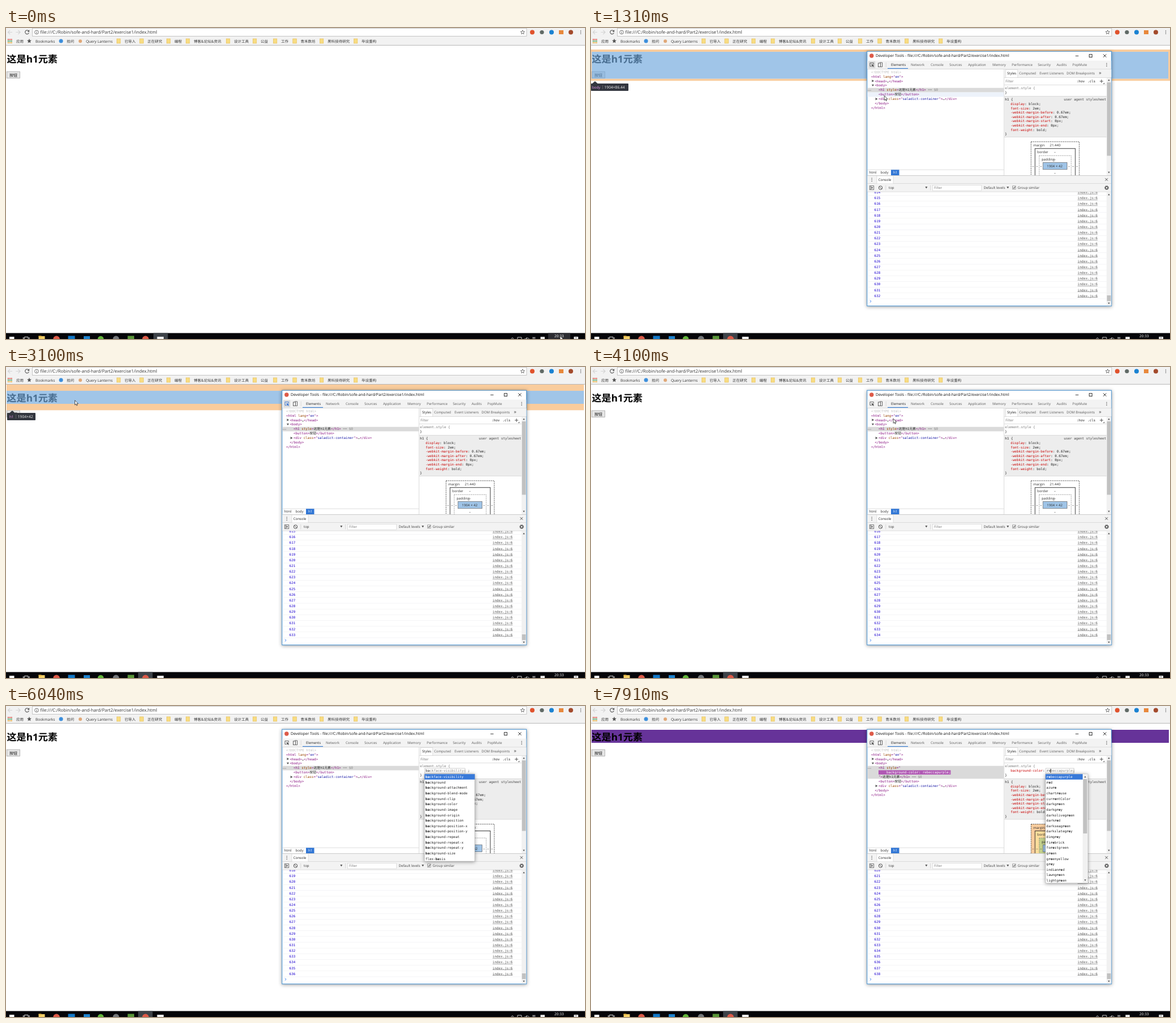
Recreate the animation shown at these times as an HTML page. Size 1021x549 px, loop 8000 ms.

```html
<!DOCTYPE html>
<html lang="zh">
<head>
<meta charset="utf-8">
<title>Inspecting an element</title>
<style>
html, body { margin: 0; width: 100%; height: 100%; overflow: hidden; background: #fff; }
svg { display: block; width: 100%; height: 100%; }
text { white-space: pre; text-rendering: geometricPrecision; font-family: 'Open Sans', 'Noto Sans CJK SC', 'Noto Sans CJK', sans-serif; }
.mono { font-family: 'DejaVu Sans Mono', 'Noto Sans CJK SC', 'Noto Sans CJK', monospace; }
.bold { font-weight: 700; }
.shadow { filter: drop-shadow(0 1px 3px rgba(0,0,0,.4)); }
</style>
</head>
<body>
<svg viewBox="0 0 1021 549" xmlns="http://www.w3.org/2000/svg">
  <defs>
    <clipPath id="paneClip"><rect x="728" y="101" width="181" height="159"/></clipPath>
    <clipPath id="logClip"><rect x="487" y="289.5" width="422" height="201"/></clipPath>
  </defs>
  <g id="page"></g>
  <g id="overlay"></g>
  <g id="chrome"></g>
  <g id="taskbar"></g>
  <g id="dev">
    <g id="frame"></g>
    <g id="inspect"></g>
    <g id="tree"></g>
    <g id="styles" clip-path="url(#paneClip)"></g>
    <g id="thumb"></g>
    <g id="log" clip-path="url(#logClip)"></g>
    <g id="popup"></g>
  </g>
  <path id="cursor" d="M0 0V8.2L1.9 6.5L3.1 9.3L4.4 8.7L3.2 6H5.8Z" fill="#fff" stroke="#111" stroke-width=".7"/>
</svg>
<script>
const LOOP = 8000, CH = 3.53, MONO = 5.88;
const $ = id => document.getElementById(id);
const esc = s => String(s).replace(/&/g, '&amp;').replace(/</g, '&lt;');
const rect = (x, y, w, h, fill, more = '') =>
  `<rect x="${x}" y="${y}" width="${w}" height="${h}" fill="${fill}" ${more}/>`;
const dot = (x, y, r, fill, more = '') => `<circle cx="${x}" cy="${y}" r="${r}" fill="${fill}" ${more}/>`;
const path = (d, stroke, w = 1, fill = 'none', more = '') =>
  `<path d="${d}" stroke="${stroke}" stroke-width="${w}" fill="${fill}" ${more}/>`;
const shape = (d, fill) => `<path d="${d}" fill="${fill}"/>`;
const text = (x, cy, s, fill = '#333', size = 6.05, cls = '') =>
  `<text x="${x}" y="${cy + size * .36}" font-size="${size}" fill="${fill}" class="${cls}">${esc(s)}</text>`;
// Spans alternate colour and text.
const code = (x, cy, ...spans) => {
  let out = '';
  for (let i = 0; i < spans.length; i += 2) out += `<tspan fill="${spans[i]}">${esc(spans[i + 1])}</tspan>`;
  return `<text class="mono" x="${x}" y="${cy + 2.1}" font-size="${MONO}">${out}</text>`;
};
const down = (x, y, r = 2) => shape(`M${x - r} ${y - r * .8}h${2 * r}l${-r} ${r * 1.7}z`, '#555');
const up = (x, y, r = 2) => shape(`M${x - r} ${y + r * .8}h${2 * r}l${-r} ${-r * 1.7}z`, '#555');
const right = (x, y) => shape(`M${x - 1.6} ${y - 2.2}v4.4l3.8 -2.2z`, '#555');
const more = (x, y) => [-2.6, 0, 2.6].map(d => dot(x, y + d, .75, '#555')).join('');
const star = (x, y, r) => {
  let d = '';
  for (let i = 0; i < 10; i++) {
    const a = Math.PI * (i / 5 - .5), k = i % 2 ? r * .45 : r;
    d += `${i ? 'L' : 'M'}${(x + k * Math.cos(a)).toFixed(2)} ${(y + k * Math.sin(a)).toFixed(2)}`;
  }
  return d + 'Z';
};
const cross = (x, y, r, c, w) => path(`M${x - r} ${y - r}l${2 * r} ${2 * r}m0 ${-2 * r}l${-2 * r} ${2 * r}`, c, w);

const URL_TEXT = 'file:///C:/Robin/sofe-and-hard/Part2/exercise1/index.html';
const TAG = '#881280', ATTR = '#994500', VAL = '#1a1aa6', INK = '#222', RED = '#c80000', GREY = '#888';

function browserBar() {
  let s = rect(0, 0, 1021, 30, '#f2f2f2') + rect(0, 30, 1021, 1, '#b8b8b8');
  s += rect(46.5, .5, 871.5, 14, '#fff', 'stroke="#b9b9b9" stroke-width=".8"');
  s += path('M11 7.5H3.5M7 4L3.5 7.5L7 11M17.5 7.5H25M21.5 4L25 7.5L21.5 11', '#d4d4d4', 1.1);
  s += path('M39.8 5.2A3.4 3.4 0 1 0 40.4 8.4', '#505050', 1.1) + shape('M41.2 3.2v3.6h-3.6z', '#505050');
  s += dot(54, 7.5, 3.4, 'none', 'stroke="#555" stroke-width=".8"') + rect(53.6, 7, .9, 2.6, '#555') + rect(53.6, 5.4, .9, .9, '#555');
  s += text(60.5, 7.4, URL_TEXT, '#333', 7.75);
  s += path(star(911, 7.6, 3.8), '#555', .8);
  s += dot(928, 7.5, 4, '#e0522d') + dot(945, 7.5, 3.6, '#606a66') + dot(962, 7.5, 4, '#1a82d2');
  s += rect(975, 4, 8, 7, '#e8883c') + dot(996, 7.5, 4, '#a34a2c') + more(1013.5, 7.5);
  ['#d9483b', '#3b9a4f', '#e2a52b'].forEach((c, i) => {
    for (let j = 0; j < 3; j++) s += rect(3 + j * 2.9, 19.3 + i * 2.9, 1.9, 1.9, c);
  });
  s += shape(star(41, 23, 4.2), '#555') + dot(97, 23, 3.5, '#3d8fdc') + dot(131, 23.3, 3, '#e0a878');
  const marks = [[18, '应用'], [52, 'Bookmarks'], [107, '拾问'], [141, 'Query Lanterns']];
  const folders = [[209, '已导入'], [249.5, '正在研究'], [297, '编程'], [331, '博客&论坛&资讯'], [402, '设计工具'],
    [449, '公益'], [485, '工作'], [519.5, '青禾数坊'], [567, '黑科技待研究'], [627, '毕设重构']];
  for (const [x, label] of marks) s += text(x, 23.2, label, '#333', 6.5);
  for (const [x, label] of folders)
    s += rect(x - 13.7, 19, 6.5, 8, '#f8dc83', 'stroke="#e5bd52" stroke-width=".6"') + text(x, 23.2, label, '#333', 6.5);
  return s;
}

function page(purple) {
  let s = purple ? rect(1, 42, 1018, 23, '#663399') : '';
  s += text(1.5, 54.5, '这是h1元素', '#000', 17.1, 'bold');
  s += rect(1.5, 77, 23, 11.5, '#e6e6e6', 'stroke="#a6a6a6" stroke-width=".8"');
  return s + text(6, 83, '按钮', '#111', 7);
}

function tip(x, y, w, arrow, name, sep, size) {
  return shape(`M${arrow - 5} ${y + .3}l5 -4.3l5 4.3z`, '#33363f') + rect(x, y, w, 13, '#33363f', 'rx="1"') +
    text(x + (x ? 4 : 2), y + 6.4, name, '#ee9cf2', 6.2) + rect(sep, y + 3, .6, 7, '#777') +
    text(sep + 3.5, y + 6.4, size, '#eee', 6.7);
}

function overlay(kind) {
  const blue = 'rgba(111,168,220,.66)', orange = 'rgba(246,178,107,.66)';
  if (kind === 'body')
    return shape('M0 38H1021V93.3H0ZM1.3 42V89.5H1018V42Z', orange) + rect(1.3, 42, 1016.7, 47.5, blue) +
      tip(0, 98, 66, 7, 'body', 20, '1904×86.44');
  if (kind === 'h1')
    return rect(1, 31, 1018, 11, orange) + rect(1, 65, 1018, 11.3, orange) + rect(1, 42, 1018, 23, blue) +
      tip(2, 81, 50, 11, 'h1', 17.3, '1904×42');
  return '';
}

function taskbar(active, clockHover) {
  let s = rect(0, 538.5, 1021, 11, '#050509');
  s += rect(active - 13, 538.5, 25.5, 11, '#3d4248');
  if (clockHover) s += rect(956, 538.5, 39, 11, '#2c2c31');
  s += rect(6, 545, 8.5, 8, '#fff') + path('M32.5 550V545.5H39V550M30.5 546V550M41 546V550', '#fff', .9);
  s += rect(57.5, 544, 11, 8, '#f4cf68') + rect(57.5, 543.3, 5, 2, '#e3b23f');
  for (const x of [89, 246]) s += dot(x, 549.3, 5.8, '#dd5a48');
  s += rect(109.5, 543.5, 12, 8, '#1279c9') + rect(137, 544, 11, 8, '#1d83cf') + dot(167, 549, 5.3, '#62b53a');
  s += dot(194, 549, 5.5, '#74777a') + rect(214.5, 543.5, 11.5, 8, '#5a9638') + rect(266.5, 545, 11.5, 8, '#f3f3f3');
  s += path('M890.5 549l2.5 -2.3l2.5 2.3M902 550v-4h7v4M914 549h2l2.5 -2.5v4M920 546.5l2.5 2.5', '#ddd', .9);
  s += text(927.5, 548.5, '英', '#eee', 6.8) + rect(942.5, 545.2, 7.5, 6, '#eee') + rect(1001.5, 545, 7.5, 6, '#fff');
  s += path('M1003 547h4.5', '#111', .7);
  return s + text(967, 544, '20:33', '#fff', 6.5);
}

function devFrame() {
  const line = '#cfcfcf';
  let s = rect(486.8, 41.2, 431, 449.5, '#fff', 'stroke="#3f8fd2" stroke-width="1" class="shadow"');
  s += dot(494.8, 49, 3.7, '#dd5a48') + text(502, 49, 'Developer Tools - ' + URL_TEXT, '#111', 6.76);
  s += path('M854.3 49.3h5.4', '#222', .9) + rect(878.6, 46.6, 5, 5, 'none', 'stroke="#222" stroke-width=".9"') + cross(906, 49, 2.7, '#222', .9);
  s += rect(487.3, 57.5, 430, 14.5, '#f3f3f3') + rect(487.3, 72, 430, .8, line);
  s += rect(523, 70.8, 36, 1.2, '#4285d6');
  const tabs = [[529, 'Elements'], [564, 'Network'], [599, 'Console'], [632, 'Sources'], [665, 'Application'],
    [708, 'Memory'], [742, 'Performance'], [788, 'Security'], [821, 'Audits'], [849, 'PopMute']];
  tabs.forEach(([x, label], i) => s += text(x, 65, label, i ? '#5a5a5a' : '#222'));
  s += rect(506.5, 62, 4, 6.6, '#f3f3f3', 'stroke="#555" stroke-width=".9"') + path('M509 61h4.6v7.6h-2.5', '#555', .9);
  s += rect(519.8, 60.5, .7, 9, line) + more(909.3, 65);

  s += rect(727.8, 72.8, .8, 187.5, line) + rect(728.6, 72.8, 189, 14.2, '#f3f3f3') + rect(728.6, 87, 189, .7, line);
  s += rect(731.2, 73.3, 21, 14.4, '#fff', `stroke="${line}" stroke-width=".6"`);
  for (const [x, label] of [[733.7, 'Styles'], [755, 'Computed'], [791, 'Event Listeners'], [838.5, 'DOM Breakpoints']])
    s += text(x, 80, label, x < 740 ? '#222' : '#5a5a5a');
  s += text(895.5, 79, '»', '#444', 9);
  s += text(731, 94, 'Filter', '#777') + code(856.5, 94, INK, ':hov') + code(875.5, 94, INK, '.cls');
  s += path('M900.2 91v6M897.2 94h6', '#444', .9) + shape('M903 99h2.4v-2.4z', '#555') + rect(728.6, 100.3, 181, .7, line);
  s += rect(909.2, 88, 8.1, 172, '#f1f1f1') + up(913.2, 92, 1.7) + down(913.2, 255, 1.7);

  s += rect(487.3, 249.8, 240.5, .7, line) + rect(529, 250.3, 14.5, 9.8, '#3277d5');
  s += text(490.5, 255.3, 'html') + text(510.5, 255.3, 'body') + text(533, 255.3, 'h1', '#fff');
  s += rect(487.3, 260.2, 430, 14.3, '#f3f3f3') + rect(487.3, 260.2, 430, .7, '#bbb') + rect(487.3, 274.2, 430, .7, line);
  s += more(495.2, 267.8) + rect(504, 261, 29, 13.9, '#fff', `stroke="${line}" stroke-width=".6"`);
  s += text(506.7, 268, 'Console', '#222') + cross(909, 267.5, 2.3, '#444', .9);
  s += rect(487.3, 275, 430, 14, '#f3f3f3') + rect(487.3, 288.8, 430, .7, line);
  s += rect(491.3, 278.7, 7.4, 6.6, 'none', 'stroke="#555" stroke-width=".8"') + path('M493.3 279v6', '#555', .8) + shape('M494.6 280v4l2.8 -2z', '#555');
  s += dot(510.5, 282, 3.2, 'none', 'stroke="#444" stroke-width=".9"') + path('M508.3 279.8l4.4 4.4', '#444', .9);
  s += rect(519.5, 277.5, .7, 9, line) + rect(598.2, 277.5, .7, 9, line) + text(525, 282, 'top') + down(591.3, 281.6);
  s += rect(602.5, 277.3, 86, 9.8, '#fff', `stroke="${line}" stroke-width=".6"`) + text(605, 282.3, 'Filter', '#777');
  s += text(692.5, 282, 'Default levels', '#444') + down(735, 281.6);
  s += rect(743.3, 278.9, 5.6, 5.6, '#fff', 'stroke="#777" stroke-width=".7"') + path('M744.4 281.7l1.4 1.5l2.2 -3.2', '#222', 1);
  s += text(752.3, 282, 'Group similar', '#444');
  s += dot(909.3, 282, 2.3, 'none', 'stroke="#555" stroke-width="1.6"') + dot(909.3, 282, 3.5, 'none', 'stroke="#555" stroke-width="1" stroke-dasharray="1.37 1.37"');
  s += rect(909.2, 289.5, 8.1, 200.7, '#f1f1f1') + up(913.2, 294, 1.7) + down(913.2, 486, 1.7) + rect(909.8, 472, 6.8, 10, '#c1c1c1');
  return s;
}

function inspectIcon(mode) {
  const c = mode === 2 ? '#3b78d8' : '#555';
  return (mode ? rect(489.3, 58.5, 12, 12.5, '#dcdcdc') : '') +
    path('M494.5 67.5H492V61.7H498.3V64', c, .9) + shape('M494.6 63.7l4.8 1.9l-1.9 .8l1.6 1.7l-.9 .8l-1.6 -1.7l-.9 1.6z', c);
}

function tree(styled, hover) {
  const close = ['>', '这是h1元素', '</h1>', ' == $0'];
  const tail = [TAG, close[0], INK, close[1], TAG, close[2], GREY, close[3]];
  const rows = [
    [494, '#bbb', '<!DOCTYPE html>'],
    [494, TAG, '<html ', ATTR, 'lang', TAG, '="', VAL, 'en', TAG, '">'],
    [500.5, TAG, '<head>', INK, '…', TAG, '</head>'],
    [500.5, TAG, '<body>'],
    ...(styled ? [
      [507, TAG, '<h1 ', ATTR, 'style', TAG, '="'],
      [521, '#fff', 'background-color: rebeccapurple;'],
      [507, TAG, '"', ...tail]
    ] : [[507, TAG, '<h1 ', ATTR, 'style', ...tail]]),
    [507, TAG, '<button>', INK, '按钮', TAG, '</button>'],
    [507, TAG, '<div ', ATTR, 'class', TAG, '="', VAL, 'saladict-container', TAG, '">', INK, '…', TAG, '</div>'],
    [500.5, TAG, '</body>'],
    [494, TAG, '</html>']
  ];
  let s = rect(487.3, 105.7, 240.5, styled ? 22.7 : 7.8, '#dadada');
  if (hover) s += rect(487.3, 113.5, 240.5, 8, '#edf2fa');
  if (styled) s += rect(507, 113.4, 127.3, 7.6, '#b058b4');
  rows.forEach(([x, ...spans], i) => s += code(x, 77.5 + 7.95 * i, ...spans));
  [0, 2.2, 4.4].forEach(d => s += dot(488.7 + d, 110, .6, '#666'));
  return s + right(497, 93.4) + down(497, 101.4) + right(503.3, 77.5 + 7.95 * (styled ? 8 : 6));
}

function boxModel(y, tint) {
  const fill = c => tint ? c : 'none', dash = 'stroke-dasharray="2 1.3"';
  let s = rect(776, y, 85, 86, fill('#f9cc9d'), `stroke="#222" stroke-width=".8" ${dash}`);
  s += rect(783, y + 12, 71, 62, fill('#fddd9b'), 'stroke="#222" stroke-width=".9"');
  s += rect(790.3, y + 24.5, 56.5, 37, fill('#c3d08b'), `stroke="#777" stroke-width=".7" ${dash}`);
  s += rect(797, y + 36.5, 42.5, 12.5, '#9fc4e7', 'stroke="#666" stroke-width=".7"');
  s += text(780, y + 6.4, 'margin') + text(809, y + 6.4, '21.440') + text(787, y + 18.4, 'border') + text(816.5, y + 18.4, '–');
  s += text(794.5, y + 31, 'padding') + text(816.5, y + 31, '–') + text(804, y + 43, '1904 × 42') + text(816.5, y + 55.5, '–');
  for (const x of [778, 785, 792, 841.5, 848.5, 855.5]) s += text(x, y + 43, '–');
  return s;
}

function prompt(x, typed, hint, end, caret) {
  const w = Math.max(typed.length, hint.length) * CH;
  return rect(x - 1.7, 110, w + 4, 8.8, '#fff', 'stroke="#bbb" stroke-width=".7"') +
    code(x, 114.3, INK, typed, GREY, hint.slice(typed.length), INK, end) +
    (caret ? rect(x + typed.length * CH - .3, 110.8, .7, 7.2, '#000') : '');
}

function styles(e) {
  const dy = e.field ? 7.7 : 0;
  let s = code(730, 106, '#777', 'element.style {') + code(730, 114.2 + dy, INK, '}');
  if (e.field === 'name') s += prompt(740, e.typed, e.hint, ': ;', e.caret);
  if (e.field === 'value') s += code(740, 114.3, RED, 'background-color', INK, ':') + prompt(803.6, e.typed, e.hint, ';', e.caret);
  s += rect(728.6, 120.5 + dy, 181, 71.7, '#ededed') + rect(728.6, 120.3 + dy, 181, .7, '#cfcfcf') + rect(728.6, 192 + dy, 181, .7, '#cfcfcf');
  s += code(730, 126 + dy, INK, 'h1 {') + code(834, 126 + dy, '#444', 'user agent stylesheet');
  const rules = [['display', 'block'], ['font-size', '2em'], ['-webkit-margin-before', '0.67em'], ['-webkit-margin-after', '0.67em'],
    ['-webkit-margin-start', '0px'], ['-webkit-margin-end', '0px'], ['font-weight', 'bold']];
  rules.forEach(([k, v], i) => s += code(740, 134 + dy + 7.57 * i, RED, k, INK, `: ${v};`));
  return s + code(730, 187 + dy, INK, '}') + boxModel(200.8 + dy, e.styled);
}

function log(last) {
  let s = '';
  for (let i = 0; i < 19; i++) {
    const y = 290 + 10.147 * i;
    s += rect(487.3, y + 5, 422, .6, '#ededf0') + code(499.6, y, '#1c00cf', last - 18 + i);
    s += code(858, y, '#545454', 'index.js:6') + rect(858, y + 2.9, 35.4, .5, '#545454');
  }
  return s + path('M491.8 480.5l2.3 2l-2.3 2', '#367cf1', .9);
}

const NAMES = ('backface-visibility background background-attachment background-blend-mode background-clip background-color ' +
  'background-image background-origin background-position background-position-x background-position-y background-repeat ' +
  'background-repeat-x background-repeat-y background-size flex-basis').split(' ');
const COLOURS = ('aliceblue antiquewhite aqua aquamarine azure beige bisque black blanchedalmond blue blueviolet brown ' +
  'burlywood cadetblue chartreuse chocolate coral cornflowerblue cornsilk crimson').split(' ');
const REDS = ('rebeccapurple red azure chartreuse currentColor darkgreen darkgrey darkolivegreen darkred darkseagreen ' +
  'darkslategrey dimgrey firebrick forestgreen green greenyellow grey indianred lawngreen lightgreen').split(' ');

function popup(e) {
  if (!e.list) return '';
  const step = 9.63, x = e.field === 'name' ? 738 : 801.5, w = e.width, h = e.list.length * step;
  let s = rect(x, 120, w, h, '#fff', 'stroke="#b5b5b5" stroke-width=".6" class="shadow"');
  const bar = e.field === 'value' ? 9 : 0;
  e.list.forEach((item, i) => {
    const y = 125 + step * i, on = i === e.sel, k = item.indexOf(e.typed), n = k + e.typed.length;
    if (on) s += rect(x, y - 4.8, w - bar, step, '#3879d9');
    s += `<text class="mono" x="${x + 1.6}" y="${y + 2.1}" font-size="${MONO}" fill="${on ? '#fff' : INK}">` +
      `${item.slice(0, k)}<tspan class="bold">${item.slice(k, n)}</tspan>${item.slice(n)}</text>`;
  });
  if (bar) {
    const bx = x + w - bar;
    s += rect(bx, 120.3, bar - .3, h - .6, '#f1f1f1') + rect(bx + .8, 129, 7, 96, '#c1c1c1') + up(bx + 4.4, 125, 1.6) + down(bx + 4.4, 307.5, 1.6);
  }
  return s;
}

function editState(t) {
  if (t < 4700) return {};
  if (t < 5410) return { field: 'name', typed: '', hint: '', caret: true };
  if (t < 7290) {
    const sel = [6510, 6600, 6740, 6940, 7060].filter(k => t >= k).length;
    return { field: 'name', typed: t < 5490 ? 'b' : 'ba', hint: NAMES[sel], list: NAMES, sel, width: 88.7, caret: t < 6040 || t >= 6510 };
  }
  if (t < 7750) return { field: 'value', typed: '', hint: '', list: COLOURS, sel: -1, width: 86.5, caret: true };
  return { field: 'value', typed: t < 7830 ? 'r' : 're', hint: REDS[0], list: REDS, sel: 0, width: 74.5, caret: true, styled: t >= 7830 };
}

const MOVES = [
  [0, 977, 543.5], [70, 977, 543.5], [200, 820, 360], [330, 560, 250], [470, 330, 380], [610, 247, 543],
  [1010, 247, 543], [1310, 517, 119.5], [1500, 570, 108], [1760, 654, 79], [1870, 640, 77], [2080, 496, 64.5],
  [2230, 496, 64.5], [2550, 230, 79], [2700, 230, 79], [3100, 121.5, 58.8], [3640, 121.5, 58.8],
  [4400, 800, 112], [4700, 800, 112], [5200, 1025, 130], [LOOP, 1025, 130]
];
function cursorAt(t) {
  const i = Math.max(1, MOVES.findIndex(m => m[0] > t));
  const [t0, x0, y0] = MOVES[i - 1], [t1, x1, y1] = MOVES[i], p = (t - t0) / (t1 - t0);
  return [x0 + (x1 - x0) * p, y0 + (y1 - y0) * p];
}

// Redraw a layer only when its inputs change.
const seen = {};
function layer(id, draw, ...args) {
  const key = JSON.stringify(args);
  if (seen[id] === key) return;
  seen[id] = key;
  $(id).innerHTML = draw(...args);
}

function render(t) {
  const edit = editState(t);
  const lit = (t >= 1230 && t < 1640) || (t >= 2400 && t < 2800) ? 'body' : t >= 2800 && t < 3330 ? 'h1' : '';
  layer('page', page, !!edit.styled);
  layer('overlay', overlay, lit);
  layer('taskbar', taskbar, t < 1010 ? 273 : 246, t < 100);
  $('dev').style.display = t < 1010 ? 'none' : '';
  layer('inspect', inspectIcon, t >= 3330 ? 0 : t >= 2050 ? 2 : 1);
  layer('tree', tree, !!edit.styled, t >= 1250 && t < 1430);
  layer('styles', styles, edit);
  layer('thumb', h => rect(909.8, 96, 6.8, h, '#c1c1c1'), edit.field ? 124.5 : 129.5);
  layer('log', log, 631 + Math.floor((t - 270) / 1000));
  layer('popup', popup, edit);
  const [x, y] = cursorAt(t);
  $('cursor').setAttribute('transform', `translate(${x.toFixed(2)} ${y.toFixed(2)})`);
}

layer('chrome', browserBar);
layer('frame', devFrame);
const start = performance.now();
function tick() {
  render((performance.now() - start) % LOOP);
  requestAnimationFrame(tick);
}
render(0);
requestAnimationFrame(tick);
</script>
</body>
</html>
```
